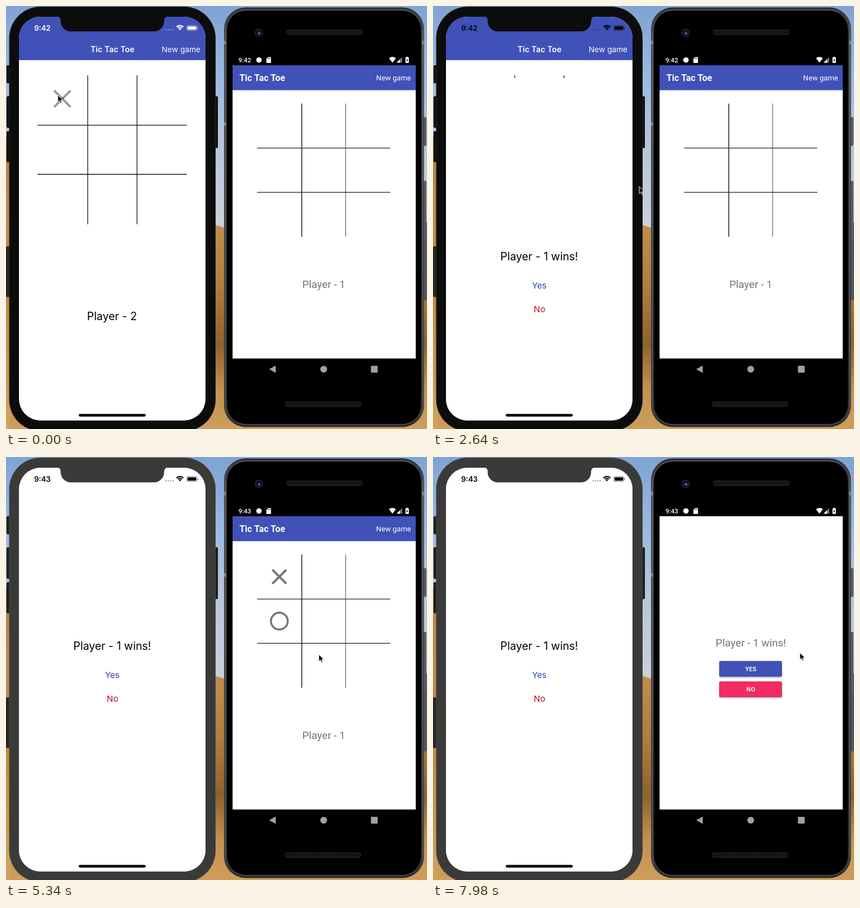
These frames come from a looping animation (747x750 px, 8000 ms). An HTML page with a canvas:

```html
<!DOCTYPE html>
<html lang="en">
<head>
<meta charset="utf-8">
<title>Tic Tac Toe</title>
<style>
html, body { margin: 0; width: 100%; height: 100%; overflow: hidden; background: #000; }
canvas { display: block; }
</style>
</head>
<body>
<canvas id="stage" width="747" height="750"></canvas>
<script>
const ctx = document.getElementById('stage').getContext('2d');
const LOOP = 8000, STEP = 60, FADE = 400;
const BLUE = '#4051b8', GREY = '#75757a';

const clamp = v => Math.max(0, Math.min(1, v));
const smooth = u => u * u * (3 - 2 * u);
const easeOut = u => 1 - (1 - u) ** 3;
const easeInOut = u => (1 - Math.cos(Math.PI * u)) / 2;

// Moves as column, row, in playing order
const moves = [[0, 0], [0, 1], [1, 1], [1, 2], [2, 2]];
const iosClicks = [-160, 780, 1500, 2020, 2300];
const droidClicks = [3620, 4450, 5820, 6520, 7290];
const MODAL_IOS = 2405, MODAL_DROID = 7392, FOCUS = 3500, MINUTE = 4300;

// Pointer stops: time, x, y
const path = [
  [0, 92, 158], [260, 92, 158], [660, 100, 250], [840, 100, 252],
  [1300, 186, 254], [1540, 186, 254], [1900, 170, 333], [2040, 172, 336],
  [2230, 268, 338], [2340, 270, 338], [2640, 366, 320], [3360, 497, 212],
  [3700, 497, 212], [4250, 486, 286], [4650, 486, 288], [5280, 555, 350],
  [5400, 555, 350], [5720, 562, 294], [5960, 562, 294], [6350, 562, 368],
  [6640, 562, 368], [7080, 642, 368], [7300, 642, 368], [7440, 653, 336],
  [7800, 651, 347], [8000, 651, 347]
];

function box(x, y, w, h, r, color) {
  ctx.beginPath();
  ctx.roundRect(x, y, w, h, r);
  ctx.fillStyle = color;
  ctx.fill();
}

function disc(x, y, r, color) {
  ctx.beginPath();
  ctx.arc(x, y, r, 0, 7);
  ctx.fillStyle = color;
  ctx.fill();
}

function ring(x, y, r, width, color) {
  ctx.beginPath();
  ctx.arc(x, y, r, 0, 7);
  ctx.lineWidth = width;
  ctx.strokeStyle = color;
  ctx.stroke();
}

function line(x1, y1, x2, y2, width, color) {
  ctx.beginPath();
  ctx.moveTo(x1, y1);
  ctx.lineTo(x2, y2);
  ctx.lineWidth = width;
  ctx.strokeStyle = color;
  ctx.stroke();
}

function poly(points, color) {
  ctx.beginPath();
  points.forEach(([x, y]) => ctx.lineTo(x, y));
  ctx.closePath();
  ctx.fillStyle = color;
  ctx.fill();
}

function text(str, x, y, font, color, align = 'center') {
  ctx.font = font;
  ctx.textAlign = align;
  ctx.fillStyle = color;
  ctx.fillText(str, x, y);
}

const inter = (size, weight = 400) => `${weight} ${size}px Inter, sans-serif`;
const roboto = (size, weight = 400) => `${weight} ${size}px Roboto, sans-serif`;

function vertical(y1, y2, stops) {
  const g = ctx.createLinearGradient(0, y1, 0, y2);
  stops.forEach(([y, c]) => g.addColorStop((y - y1) / (y2 - y1), c));
  return g;
}

function drawWallpaper() {
  const sky = vertical(0, 750, [[0, '#7fa3d3'], [140, '#9dbbe2'], [230, '#b5c4da'], [385, '#c9d0da'], [750, '#c9d0da']]);
  box(0, 0, 747, 750, 0, sky);
  const dune = vertical(230, 750, [[230, '#b5814a'], [400, '#c18c4b'], [500, '#b27c3c'], [600, '#8f622f'], [680, '#c4924e'], [750, '#cf9d5b']]);
  poly([[0, 232], [8, 240], [200, 340], [371, 388], [390, 394], [560, 520], [747, 520], [747, 750], [0, 750]], dune);
  box(0, 426, 8, 90, 3, '#2b2622');
  box(738, 384, 9, 138, 0, '#55565b');
  box(0, 516, 8, 234, 0, vertical(516, 750, [[516, '#c08840'], [750, '#d3a25e']]));
}

function drawMark(isX, x, y, size, color, alpha) {
  ctx.globalAlpha = alpha;
  if (isX) {
    const h = 13.6 * size;
    line(x - h, y - h, x + h, y + h, 4, color);
    line(x - h, y + h, x + h, y - h, 4, color);
  } else {
    ring(x, y, 16.4 * size, 3.5, color);
  }
  ctx.globalAlpha = 1;
}

function drawMarks(t, clicks, x0, y0, cell, size, color) {
  moves.forEach(([col, row], i) => {
    const alpha = clamp((t - clicks[i]) / FADE);
    if (alpha) drawMark(i % 2 === 0, x0 + col * cell, y0 + row * cell, size, color, alpha);
  });
}

function status(t, clicks) {
  const n = clicks.filter(c => c <= t).length;
  return n === moves.length ? 'Gameover!' : `Player - ${n % 2 + 1}`;
}

function drawIosStatus(color, clock) {
  text(clock, 50, 43.6, inter(13, 600), color, 'left');
  ctx.globalAlpha = 0.35;
  for (let i = 0; i < 4; i++) disc(284 + i * 4.2, 42, 1.3, color);
  ctx.globalAlpha = 1;
  for (const r of [1.6, 5, 8.4]) {
    ctx.beginPath();
    ctx.arc(308.6, 43, r, -Math.PI * 0.76, -Math.PI * 0.24);
    ctx.lineWidth = r < 2 ? 3 : 2.1;
    ctx.strokeStyle = color;
    ctx.stroke();
  }
  ctx.globalAlpha = 0.45;
  ctx.beginPath();
  ctx.roundRect(320.5, 34.5, 18.5, 9, 2.5);
  ctx.lineWidth = 1;
  ctx.stroke();
  box(339.8, 37.3, 1.3, 3.4, 1, color);
  ctx.globalAlpha = 1;
  box(322, 36, 15.5, 6, 1.3, color);
}

function drawIphone(t, clock) {
  const active = t < FOCUS;
  const shell = active ? '#0c0c0c' : '#3a3a39';
  const key = active ? '#111' : '#1d1d1d';
  [[1, 105, 32], [1, 160, 56], [1, 222, 55], [369, 160, 92]].forEach(([x, y, h]) => box(x, y, 7, h, 2, key));
  box(5.5, 1, 366.5, 753, 56, active ? '#222' : '#4a4a49');
  box(6.5, 2, 364.5, 751, 55, shell);

  ctx.save();
  ctx.beginPath();
  ctx.roundRect(23, 19, 331, 716, 38);
  ctx.clip();
  box(23, 19, 331, 716, 0, '#fff');
  box(23, 19, 331, 77, 0, BLUE);
  text('Tic Tac Toe', 189, 82, inter(14.1, 600), '#fff');
  text('New game', 345, 81.5, inter(13.6), '#fff', 'right');
  for (const x of [145, 232.5]) line(x, 123, x, 387, 1.3, '#111');
  for (const y of [211.3, 298.5]) line(56, y, 321, y, 1.3, '#111');
  drawMarks(t, iosClicks, 100, 164.5, 88.2, 1.07, '#000');
  text(status(t, iosClicks), 188, 557, inter(19.4), '#000');

  const shown = t >= MODAL_IOS;
  if (shown) {
    const dy = 731 * (1 - easeOut(clamp((t - MODAL_IOS) / 500)));
    box(23, 19 + dy, 331, 716, 0, '#fff');
    text('Player - 1 wins!', 188.5, 342 + dy, inter(19.4), '#000');
    text('Yes', 188.5, 392 + dy, inter(15), '#3346a8');
    text('No', 189, 434 + dy, inter(15), '#b3121f');
  }

  // Notch with small flared shoulders
  ctx.beginPath();
  ctx.moveTo(90, 18);
  ctx.quadraticCurveTo(97, 19, 97, 26);
  ctx.arcTo(97, 45, 116, 45, 18);
  ctx.lineTo(262, 45);
  ctx.arcTo(280.5, 45, 280.5, 26, 18);
  ctx.quadraticCurveTo(280.5, 19, 288, 18);
  ctx.fillStyle = shell;
  ctx.fill();
  drawIosStatus(shown ? '#000' : '#fff', clock);
  box(129, 723.3, 119, 4.6, 2.3, '#000');
  ctx.restore();
}

function drawDroidStatus(clock) {
  text(clock, 412.5, 99.8, roboto(11.4, 500), '#fff', 'left');
  for (let i = 0; i < 4; i++) {
    const a = i * Math.PI / 4, c = Math.cos(a) * 5, s = Math.sin(a) * 5;
    line(448.8 - c, 95.7 - s, 448.8 + c, 95.7 + s, 2.4, '#fff');
  }
  ring(448.8, 95.7, 2.9, 2.3, '#fff');
  poly([[465, 90.5], [470.2, 90.5], [470.2, 101], [462, 101], [462, 93.5]], '#fff');
  [464.8, 466.6, 468.4].forEach(x => line(x, 92, x, 94, 0.8, '#000'));
  ctx.beginPath();
  ctx.moveTo(685.7, 100.6);
  ctx.lineTo(679.6, 92.6);
  ctx.quadraticCurveTo(685.7, 88, 691.8, 92.6);
  ctx.fillStyle = '#fff';
  ctx.fill();
  poly([[693, 100.5], [703, 90.5], [703, 100.5]], '#777');
  poly([[693, 100.5], [699, 94.5], [699, 100.5]], '#fff');
  box(708.8, 91, 6, 10, 1, '#fff');
  box(710.4, 90, 2.8, 2, 0, '#fff');
  poly([[712.4, 92.8], [710.2, 96.8], [711.5, 96.8], [711.2, 99.6], [713.4, 95.6], [712.1, 95.6]], '#000');
}

function drawNav(color) {
  poly([[467, 644], [478.6, 637.4], [478.6, 650.6]], color);
  disc(563.7, 644, 6, color);
  box(647.5, 638, 12, 12, 1, color);
}

function drawButton(label, y, color, edge) {
  ctx.save();
  ctx.shadowColor = 'rgba(0,0,0,.4)';
  ctx.shadowBlur = 3;
  ctx.shadowOffsetY = 1.5;
  box(508, y, 111, 27.5, 2, edge);
  ctx.restore();
  box(508.8, y + 0.8, 109.4, 25.6, 1.5, color);
  ctx.save();
  ctx.shadowColor = 'rgba(0,0,0,.5)';
  ctx.shadowBlur = 2;
  ctx.shadowOffsetY = 1;
  text(label, 563.8, y + 18, roboto(11, 700), '#fff');
  ctx.restore();
}

function drawGrille(x, y) {
  box(x, y, 135, 9, 4.5, '#303030');
  box(x + 1, y + 1, 133, 7, 3.5, '#111');
  ctx.setLineDash([1, 2]);
  line(x + 5, y + 3.2, x + 130, y + 3.2, 1, '#333');
  line(x + 6, y + 5.8, x + 130, y + 5.8, 1, '#333');
  ctx.setLineDash([]);
}

function drawAndroid(t, clock) {
  box(739, 197, 7, 51, 2, '#5b5d62');
  box(739, 310, 7, 105, 2, '#5b5d62');
  box(387, 2.5, 354.5, 744, 38, '#26282b');
  box(388, 3.5, 352.5, 742, 37, vertical(3, 746, [[3, '#303236'], [60, '#63666c'], [400, '#55585e'], [700, '#505258'], [746, '#292a2d']]));
  [[387, 62], [736, 62], [387, 206]].forEach(([x, y]) => box(x, y, 5.5, 6, 0, '#85888d'));
  box(390.5, 6, 347.5, 737, 35, '#1b1c1e');
  box(392.5, 8, 343.5, 733, 33, '#000');
  ctx.beginPath();
  ctx.roundRect(391.5, 7, 345.5, 735, 34);
  ctx.lineWidth = 1;
  ctx.strokeStyle = vertical(7, 742, [[7, '#8b8d91'], [55, '#2c2d30'], [690, '#242528'], [742, '#6a6c70']]);
  ctx.stroke();

  disc(448.5, 47.5, 7.5, '#1e2023');
  disc(448.5, 47.5, 5.2, '#0b0f1a');
  disc(448.5, 48, 2.5, '#27457f');
  disc(450, 49.2, 1, '#a8bce0');
  drawGrille(497.5, 42);
  drawGrille(495, 701.5);

  box(402, 105, 325, 520, 0, '#fff');
  box(402, 105, 325, 44.3, 0, BLUE);
  text('Tic Tac Toe', 414.3, 133.3, roboto(15.8, 700), '#fff', 'left');
  text('New game', 718.7, 132.3, roboto(13), '#fff', 'right');
  line(524.8, 173, 524.8, 409, 1.4, '#111');
  line(602.7, 173, 602.7, 409, 1, '#444');
  line(445.5, 251.8, 682, 251.8, 1.2, '#222');
  line(445.5, 330.3, 682, 330.3, 1.2, '#222');
  drawMarks(t, droidClicks, 485, 212.2, 78.8, 0.91, GREY);
  text(status(t, droidClicks), 563.8, 500, roboto(18.7), GREY);
  drawNav('#a1a1a1');

  if (t >= MODAL_DROID) {
    const dy = 559 * (1 - easeInOut(clamp((t - MODAL_DROID) / 400)));
    ctx.save();
    ctx.beginPath();
    ctx.rect(402, 105, 325, 559);
    ctx.clip();
    ctx.beginPath();
    ctx.rect(402, 105 + dy, 325, 520);
    ctx.clip();
    box(402, 105 + dy, 325, 520, 0, '#fff');
    if (dy > 0) drawNav('#e6e6e6');
    text('Player - 1 wins!', 564, 336.3 + dy, roboto(18.8), GREY);
    drawButton('YES', 361.8 + dy, '#4051b8', '#33429a');
    drawButton('NO', 398 + dy, '#f52a63', '#c81d4c');
    ctx.restore();
  }
  drawDroidStatus(clock);
}

function pointerAt(t) {
  const i = path.findIndex(p => p[0] > t);
  const [t0, x0, y0] = path[i - 1], [t1, x1, y1] = path[i];
  const u = smooth((t - t0) / (t1 - t0));
  return [x0 + (x1 - x0) * u, y0 + (y1 - y0) * u];
}

function drawPointer(t) {
  const [x, y] = pointerAt(t);
  const pressed = [...iosClicks, ...droidClicks].some(c => t >= c - 90 && t < c);
  if (pressed) ring(x + 1, y + 0.5, 17.6, 2.8, '#000');
  ctx.save();
  ctx.translate(x, y);
  ctx.shadowColor = 'rgba(0,0,0,.35)';
  ctx.shadowBlur = 2;
  ctx.shadowOffsetY = 1;
  const arrow = [[0, 0], [0, 12.4], [2.9, 9.8], [4.8, 14.2], [6.9, 13.3], [5, 9], [8.8, 8.8]];
  poly(arrow, '#000');
  ctx.shadowColor = 'transparent';
  ctx.lineWidth = 1;
  ctx.strokeStyle = '#fff';
  ctx.stroke();
  ctx.restore();
}

function draw(now) {
  const t = Math.floor(now % LOOP / STEP) * STEP;
  const clock = t < MINUTE ? '9:42' : '9:43';
  drawWallpaper();
  drawIphone(t, clock);
  drawAndroid(t, clock);
  drawPointer(t);
}

let start;
function tick(now) {
  start ??= now;
  draw(now - start);
  requestAnimationFrame(tick);
}
draw(0);
requestAnimationFrame(tick);
</script>
</body>
</html>
```
